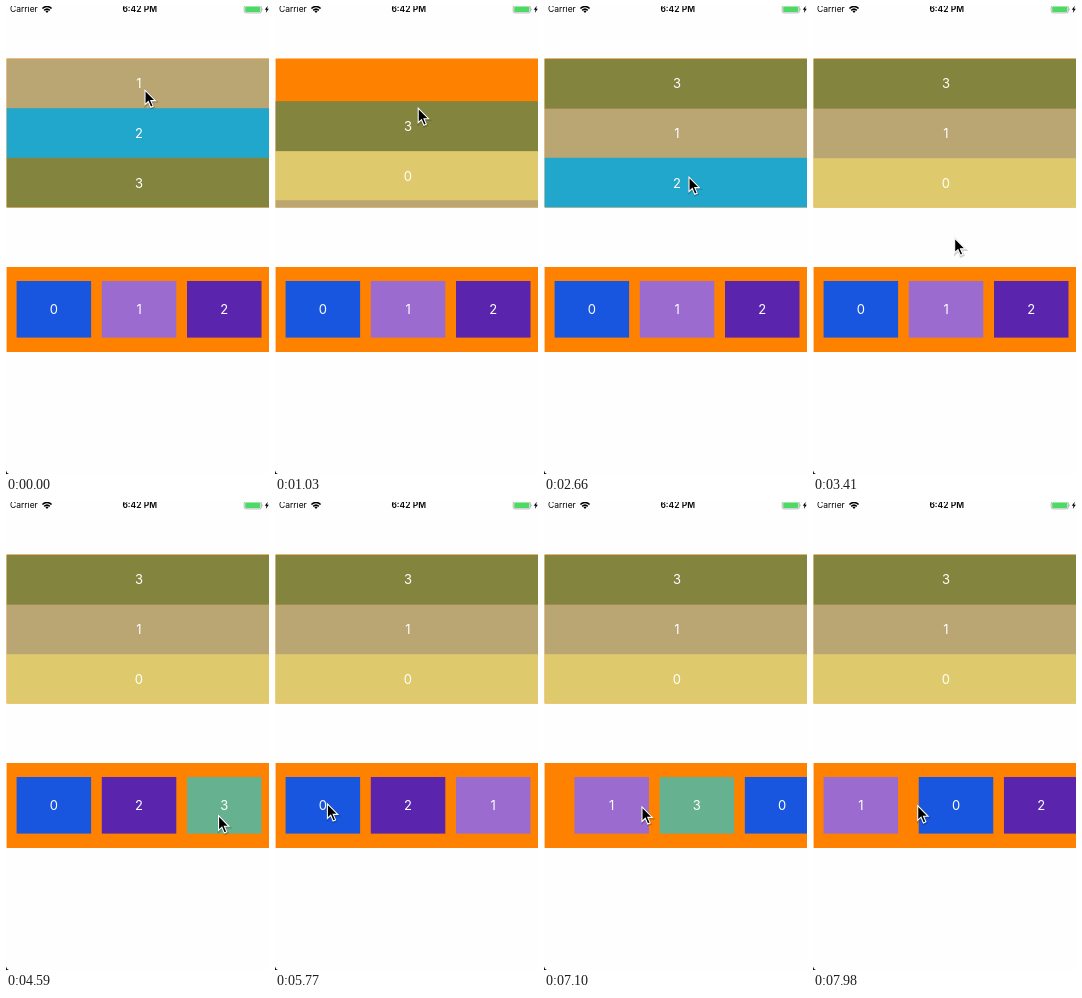
An HTML page that plays this animation: 263x468 px, repeating every 8000 ms.

```html
<!DOCTYPE html>
<html lang="en">
<head>
<meta charset="utf-8">
<title>Tap to reorder</title>
<style>
  html, body { margin: 0; width: 100%; height: 100%; overflow: hidden; background: #fefefe; }
  svg { display: block; width: 100%; height: 100%; }
  text { font-family: Inter, Roboto, sans-serif; font-size: 8.5px; }
  .label { font-size: 13px; fill: #fff; text-anchor: middle; }
</style>
</head>
<body>
<svg viewBox="0 0 263 468">
  <defs>
    <clipPath id="column"><rect x=".6" y="52.6" width="263" height="148.8"/></clipPath>
    <path id="arrow" d="M0 0V14.6L3.3 11.5L5.7 17.2L8.2 16.1L5.8 10.6H10.4Z"/>
  </defs>
  <rect width="263" height="468" fill="#fefefe"/>

  <text x="4" y="6.4">Carrier</text>
  <path d="M36.4 2.5Q41 -1.7 45.6 2.5M38.2 4.4Q41 1.8 43.8 4.4" fill="none" stroke="#000" stroke-width="1.5"/>
  <path d="M39.5 5.2L41 6.9L42.5 5.2Q41 4 39.5 5.2Z"/>
  <text x="133.7" y="6.4" font-weight="600" text-anchor="middle">6:42 PM</text>
  <rect x="238.2" y="-.4" width="17.2" height="7.3" rx="1.8" fill="none" stroke="#999" stroke-width=".7"/>
  <rect x="239.2" y=".6" width="15.2" height="5.3" rx="1" fill="#4cd964"/>
  <path d="M256.2 2.2Q257.6 3.2 256.2 4.4Z" fill="#999"/>
  <path d="M261.8 -.3L258.8 3.8H260.5L259.8 7L262.8 2.8H261.1Z"/>

  <g clip-path="url(#column)">
    <rect y="52" width="263" height="150" fill="#ff8100"/>
    <g id="rows"></g>
  </g>
  <rect x=".6" y="261" width="263" height="85" fill="#ff8100"/>
  <g id="tiles"></g>

  <path d="M0 464.5Q.4 467.4 3 468H0Z"/>
  <g id="cursor">
    <use href="#arrow" x=".5" y="1" fill="none" stroke="#000" stroke-opacity=".18" stroke-width="2.4"/>
    <use href="#arrow" stroke="#fff" stroke-width="1.1"/>
  </g>
</svg>
<script>
const NS = 'http://www.w3.org/2000/svg';
const LOOP = 8000, SLIDE = 500;
const SPEED = 0.1, LEAVE = 60, SETTLE = 90; // pointer: px per ms, pauses in ms

const rows = {
  id: 'rows', colors: ['#deca6d', '#b9a672', '#22a7cc', '#83853f'],
  first: 1, x: 0, y: 52.6, w: 265.8, h: 49.6, dx: 0, dy: 49.6
};
const tiles = {
  id: 'tiles', colors: ['#1956e0', '#9c6bd0', '#5a24ad', '#66b290'],
  first: 0, x: 10.6, y: 275, w: 74.5, h: 56.6, dx: 85.2, dy: 0
};
const lists = [rows, tiles];

// A tap sends the cell in that slot to the end of its list; x, y is the pointer tip.
const taps = [
  { list: rows, slot: 0, t: 105, x: 139, y: 84 },
  { list: rows, slot: 0, t: 900, x: 143, y: 95 },
  { list: rows, slot: 1, t: 1895, x: 144, y: 132 },
  { list: rows, slot: 2, t: 2840, x: 145, y: 171 },
  { list: tiles, slot: 1, t: 4060, x: 138, y: 299 },
  { list: tiles, slot: 2, t: 4690, x: 214, y: 314 },
  { list: tiles, slot: 0, t: 5860, x: 52.4, y: 301.8 },
  { list: tiles, slot: 0, t: 6768, x: 71, y: 309 },
  { list: tiles, slot: 1, t: 7600, x: 104.7, y: 303.7 }
];

const cursor = document.getElementById('cursor');

function add(parent, tag, attrs) {
  const el = document.createElementNS(NS, tag);
  for (const key in attrs) el.setAttribute(key, attrs[key]);
  return parent.appendChild(el);
}

function move(el, x, y) {
  el.setAttribute('transform', `translate(${x.toFixed(2)} ${y.toFixed(2)})`);
}

const clamp = p => Math.min(1, Math.max(0, p));

// cubic-bezier(.42, 0, .58, 1)
function easeInOut(p) {
  let lo = 0, hi = 1;
  for (let i = 0; i < 24; i++) {
    const s = (lo + hi) / 2, r = 1 - s;
    if (1.26 * s * r * r + 1.74 * s * s * r + s * s * s < p) lo = s;
    else hi = s;
  }
  return lo * lo * (3 - 2 * lo);
}

function build(list) {
  const group = document.getElementById(list.id);
  const overlap = list.dy ? 0.4 : 0; // hides seams between stacked rows
  list.cells = list.colors.map((fill, i) => {
    const cell = add(group, 'g', {});
    add(cell, 'rect', { width: list.w, height: list.h + overlap, fill });
    add(cell, 'text', { class: 'label', x: list.w / 2, y: list.h / 2 + 5 }).textContent = i;
    return cell;
  });
}

function layout(list, t) {
  const count = list.cells.length;
  const order = list.cells.map((_, i) => (i + list.first) % count);
  let from = 0, gap = 0;
  for (const tap of taps) {
    if (tap.list !== list || tap.t > t) continue;
    order.push(...order.splice(tap.slot, 1));
    from = tap.slot;
    gap = 1 - easeInOut(clamp((t - tap.t) / SLIDE));
  }
  order.forEach((n, i) => {
    const at = i + (i >= from ? gap : 0);
    move(list.cells[n], list.x + at * list.dx, list.y + at * list.dy);
  });
}

// After each tap the pointer heads for the next one at a steady speed.
function point(t) {
  const next = taps.findIndex(tap => tap.t > t);
  const b = taps.at(next);
  const a = next > 0 ? taps[next - 1] : b;
  const room = b.t - a.t - LEAVE - SETTLE;
  const time = Math.min(Math.hypot(b.x - a.x, b.y - a.y) / SPEED, room);
  const p = a === b ? 0 : clamp((t - a.t - LEAVE) / time);
  move(cursor, a.x + (b.x - a.x) * p, a.y + (b.y - a.y) * p);
}

function draw(t) {
  lists.forEach(list => layout(list, t));
  // past the final tap the pointer stays where it is
  point(Math.min(t, taps.at(-1).t - 1));
}

lists.forEach(build);
draw(0);
const start = performance.now();
(function tick() {
  draw((performance.now() - start) % LOOP);
  requestAnimationFrame(tick);
})();
</script>
</body>
</html>
```
